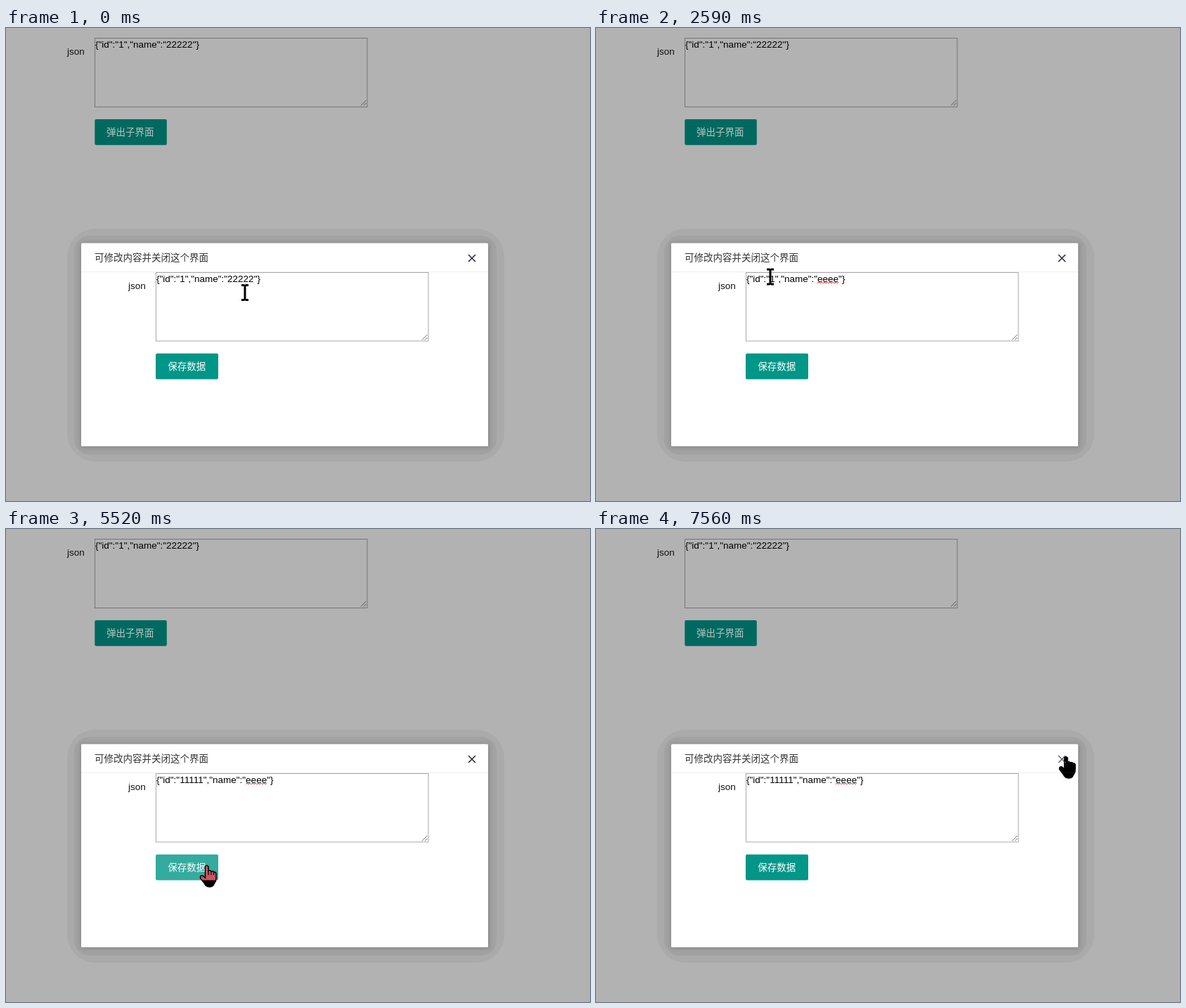
Recreate the animation shown at these times as an HTML page. Size 831 px wide and 674 px high, loop 8000 ms.

```html
<!DOCTYPE html>
<html lang="zh">
<head>
<meta charset="utf-8">
<style>
  html, body { margin: 0; width: 100%; height: 100%; overflow: hidden; background: #b2b2b2; }
  svg { display: block; width: 831px; height: 674px; }
  text { font: 13.5px "Liberation Sans", Arial, sans-serif; white-space: pre; font-kerning: normal; }
  .cjk { font-family: "Noto Sans CJK SC", "Noto Sans CJK", sans-serif; }
  .line { fill: none; }
  #handFill { mix-blend-mode: difference; fill: #fff; }
</style>
</head>
<body>
<svg viewBox="0 0 831 674">
  <defs>
    <filter id="soft" x="-5%" y="-5%" width="110%" height="110%"><feGaussianBlur stdDeviation="3"/></filter>
    <path id="grip" class="line" d="M-9 -1.5 L-1.5 -9 M-5 -1.5 L-1.5 -5"/>
    <path id="handShape" d="M-2.5 1 Q-.3 -2 2 1 V7 Q4.5 5.5 6 8 Q8.5 6.5 9.7 9 Q12.5 8.3 13 11 V18 Q13 22 10.5 25 Q9 30 3.5 30 Q-2 30 -4 24.5 L-9.5 17.5 Q-10 13 -6 14 L-2.5 17 Z"/>
  </defs>

  <rect width="831" height="674" fill="#b2b2b2"/>
  <text x="87" y="38" fill="#111">json</text>
  <rect class="line" x="126.5" y="14.5" width="387.5" height="98" stroke="#767676"/>
  <use href="#grip" x="514" y="112" stroke="#555"/>
  <text x="127" y="28">{"id":"1","name":"22222"}</text>
  <rect x="126.3" y="130" width="102.5" height="36.8" rx="2" fill="#00695f"/>
  <text class="cjk" x="143" y="153" fill="#b9c4c2">弹出子界面</text>

  <rect x="87" y="286" width="622" height="332" rx="40" fill="#aaa"/>
  <rect x="97" y="296" width="601" height="312" rx="22" fill="#a2a2a2"/>
  <rect x="106" y="306" width="582" height="292" rx="4" fill="#898989" filter="url(#soft)"/>
  <rect x="107" y="306.6" width="579" height="289.4" rx="1.5" fill="#fff"/>
  <path class="line" d="M107 347.5 H686" stroke="#eee"/>
  <text class="cjk" x="126" y="332" fill="#333">可修改内容并关闭这个界面</text>
  <path id="close" class="line" d="M658 323 L668 333 M668 323 L658 333" stroke="#2d2c3b" stroke-width="1.6"/>

  <text x="174" y="371.5" fill="#111">json</text>
  <rect class="line" x="213.5" y="348.5" width="387.5" height="97.5" stroke="#a9a9a9"/>
  <use href="#grip" x="601" y="446" stroke="#666"/>
  <rect id="selection" y="349" height="15" fill="#3297fd"/>
  <text id="field" x="214" y="361.7"><tspan></tspan><tspan fill="#fff"></tspan><tspan></tspan></text>
  <path id="squiggle" class="line" stroke="#e5393f"/>
  <rect id="caret" y="349" width="1" height="15"/>
  <rect id="button" x="213" y="463.8" width="89" height="36.6" rx="2" fill="#009688"/>
  <text class="cjk" x="230.3" y="487" fill="#fff">保存数据</text>

  <path id="beam" d="M-5 -12 h4 l1 1 l1 -1 h4 v3 h-3.5 v18 h3.5 v3 h-4 l-1 -1 l-1 1 h-4 v-3 h3.5 v-18 h-3.5 z"/>
  <path id="arrow" d="M0 0 V18 L4 14 L7 21 L10 20 L7 13 H12.5 Z"/>
  <g id="hand">
    <use id="handFill" href="#handShape"/>
    <use href="#handShape" class="line" fill="none" stroke="#000" stroke-width="1.5"/>
    <path class="line" d="M2 7 V13 M6 8 V13 M9.7 9 V13" stroke="#000" stroke-width="1.2"/>
  </g>
</svg>
<script>
const LOOP = 8000;
const SPELLCHECK_AT = 2480;

// time, cursor, x, y
const pointer = [
  [0, 'beam', 340, 377], [120, 'beam', 345, 368], [270, 'beam', 353, 361], [390, 'beam', 356, 358],
  [520, 'beam', 345, 358], [640, 'beam', 331, 358], [790, 'beam', 321, 360], [940, 'beam', 325, 373],
  [1120, 'beam', 330, 383], [1660, 'beam', 327, 393], [1800, 'beam', 304, 385], [1930, 'beam', 274, 368],
  [2060, 'beam', 250, 356], [2200, 'beam', 241, 350], [2350, 'beam', 245, 353], [2480, 'beam', 248, 354.5],
  [2740, 'beam', 350, 405], [2860, 'beam', 429.5, 440],
  [4920, 'arrow', 400, 461], [5070, 'arrow', 345, 480], [5220, 'hand', 288, 490], [5370, 'hand', 287, 485],
  [5520, 'hand', 286, 480], [5640, 'hand', 286, 484], [5790, 'hand', 285, 487], [5940, 'hand', 286, 485],
  [6090, 'hand', 286, 483], [6360, 'hand', 296, 479], [6500, 'arrow', 390, 455], [6630, 'beam', 500, 425],
  [6760, 'beam', 594, 386], [6890, 'arrow', 690, 350], [7020, 'arrow', 744, 332], [7150, 'arrow', 715, 322],
  [7290, 'hand', 673, 312], [7410, 'hand', 670, 322], [7560, 'hand', 669, 325]
];

// time, id, name, caret index (-1 hides it), start of selection
const typing = [
  [0, '1', '22222', -1], [390, '1', '22222', 23], [520, '1', '22222', 23, 21],
  [640, '1', '22222', 23, 19], [790, '1', '22222', 23, 18],
  [1120, '1', 'e', 19], [1270, '1', 'ee', 20], [1400, '1', 'eee', 21], [1530, '1', 'eeee', 22],
  [2060, '1', 'eeee', -1], [2480, '1', 'eeee', 7], [3140, '1', 'eeee', -1], [3570, '1', 'eeee', 7],
  [3850, '1', 'eeee', 8], [4220, '11', 'eeee', 9], [4500, '111', 'eeee', 10],
  [4650, '1111', 'eeee', 11], [4800, '11111', 'eeee', 12], [5370, '11111', 'eeee', -1]
];

const el = id => document.getElementById(id);
const show = (node, on) => node.setAttribute('visibility', on ? 'visible' : 'hidden');
const at = (table, t) => table.findLast(row => row[0] <= t);
const ramp = (t, from, to) => Math.min(1, Math.max(0, (t - from) / (to - from)));
const field = el('field');
const charX = i => field.getStartPositionOfChar(i).x;

function wave(from, to) {
  let d = `M${from} 364`;
  for (let x = from + 2, up = true; x <= to; x += 2, up = !up) d += `L${x} ${up ? 362 : 364}`;
  return d;
}

function drawField(t) {
  const [, id, name, caret, start] = at(typing, t);
  const value = `{"id":"${id}","name":"${name}"}`;
  const selected = start !== undefined;
  const from = selected ? start : value.length;
  const to = selected ? caret : value.length;
  [value.slice(0, from), value.slice(from, to), value.slice(to)]
    .forEach((part, i) => { field.children[i].textContent = part; });

  show(el('selection'), selected);
  if (selected) {
    el('selection').setAttribute('x', charX(from));
    el('selection').setAttribute('width', charX(to) - charX(from));
  }
  show(el('caret'), caret >= 0 && !selected);
  if (caret >= 0) el('caret').setAttribute('x', Math.round(charX(caret)));

  const nameAt = 17 + id.length;
  show(el('squiggle'), t >= SPELLCHECK_AT);
  el('squiggle').setAttribute('d', wave(charX(nameAt), charX(nameAt + name.length)));
}

function drawPointer(t) {
  const [, kind, x, y] = at(pointer, t);
  for (const name of ['beam', 'arrow', 'hand']) show(el(name), name === kind);
  el(kind).setAttribute('transform', `translate(${x} ${y})`);
}

function render(t) {
  drawField(t);
  drawPointer(t);
  const hover = ramp(t, 5220, 5500) - ramp(t, 6480, 6780);
  el('button').setAttribute('fill-opacity', 1 - 0.2 * hover);
  el('close').setAttribute('stroke-opacity', t >= 7290 ? 0.7 : 1);
}

const begin = performance.now();
function tick() {
  render((performance.now() - begin) % LOOP);
  requestAnimationFrame(tick);
}
tick();
</script>
</body>
</html>
```
